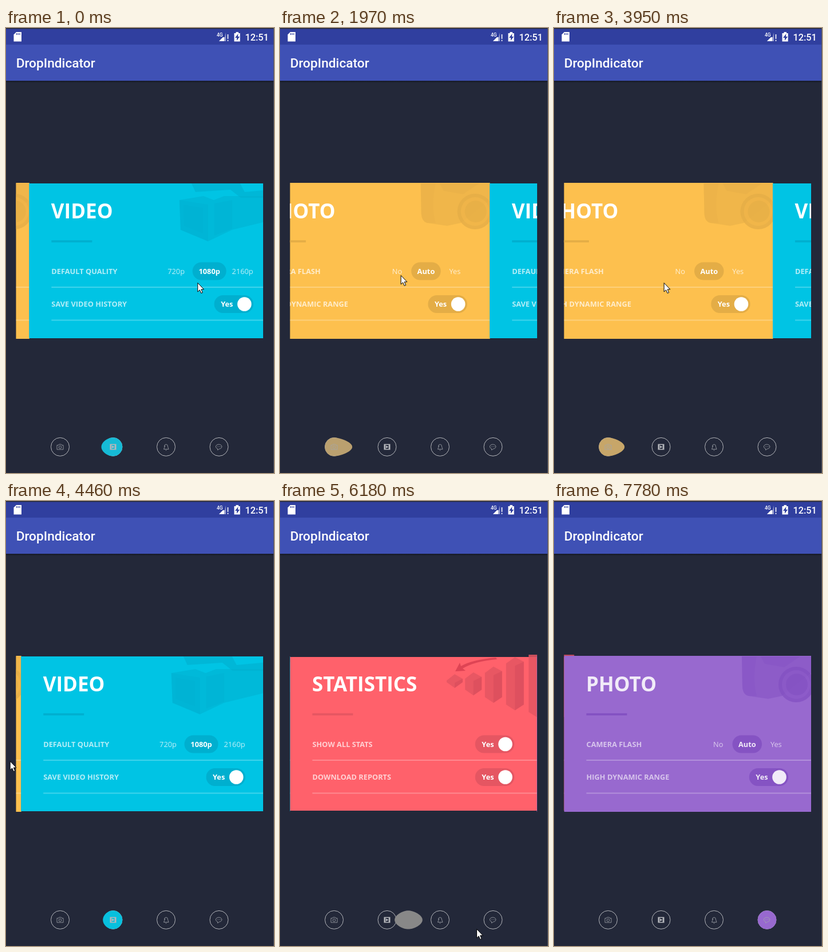
An HTML page for the animation above (8890 ms loop, 468x776 px).

```html
<!DOCTYPE html>
<html lang="en">
<head>
<meta charset="utf-8">
<title>DropIndicator</title>
<style>
html, body { margin: 0; width: 100%; height: 100%; overflow: hidden; background: #232839; }
svg { display: block; width: 100vw; height: 100vh; }
.bar { font-family: Roboto, sans-serif; font-weight: 500; fill: #fff; }
.card { font-family: "Open Sans", sans-serif; font-size: 12.8px; fill: #fff; }
.title { font-size: 35px; font-weight: 700; }
.label { font-weight: 700; fill-opacity: .7; }
.on { font-weight: 700; }
.off { fill-opacity: .75; }
.mid { text-anchor: middle; }
.icons { fill: none; stroke: #a3a6ad; stroke-width: .8; }
.icons .solid { fill: #b4b6bb; stroke: none; }
</style>
</head>
<body>
<svg viewBox="0 0 468 776" xmlns="http://www.w3.org/2000/svg">
  <defs>
    <clipPath id="pager"><rect x="17.500" y="268" width="431.500" height="276"/></clipPath>
    <linearGradient id="shade" x1="0" y1="0" x2="0" y2="1">
      <stop offset="0" stop-color="#11141f" stop-opacity=".75"/>
      <stop offset="1" stop-color="#11141f" stop-opacity="0"/>
    </linearGradient>
  </defs>

  <rect width="468" height="776" fill="#232839"/>
  <rect y="92" width="468" height="4" fill="url(#shade)"/>
  <rect width="468" height="29" fill="#303f9f"/>
  <rect width="468" height="1.500" fill="#292a33"/>
  <rect y="29" width="468" height="63" fill="#3f51b5"/>
  <rect x="467" width="1" height="776" fill="#50535e"/>

  <g class="bar">
    <path d="M18 7 H27 V23.500 H13.500 V11.500Z"/>
    <path d="M18.500 9 V12 M21.200 9 V12 M24 9 V12" stroke="#303f9f" stroke-width="1.300"/>
    <text x="368" y="14.500" font-size="8.500">4G</text>
    <path d="M384 8 V23 H372 L379 16 H382Z" opacity=".5"/>
    <path d="M381 16 V23 H372 L379 16Z"/>
    <path d="M387.500 11 V19 M387.500 20.700 V23" stroke="#fff" stroke-width="1.600"/>
    <path d="M401.500 7 H406 V9 H408.700 V23.500 H398.500 V9 H401.500Z"/>
    <path d="M405.500 10 L400 17 H403 V22 L408 15 H405Z" fill="#303f9f"/>
    <text x="417.500" y="21.500" font-size="16.300">12:51</text>
    <text x="17.700" y="69" font-size="22.700">DropIndicator</text>
  </g>

  <g clip-path="url(#pager)"><g id="cards" class="card"></g></g>

  <g id="rings" fill="none" stroke="#b4b6bb"></g>
  <path id="blob"/>
  <g class="icons">
    <path d="M89 727.500 H91.500 L92.500 726 H96.500 L97.500 727.500 H100 V735 H89Z"/>
    <circle cx="94.500" cy="731" r="2.300"/>
    <path class="solid" fill-rule="evenodd" d="M181.500 725.500 H192.500 V735.500 H181.500Z M184.300 727 H189.700 V734 H184.300Z"/>
    <path class="solid" d="M185 728 L189.500 730.500 L185 733Z"/>
    <path d="M275.500 734.500 Q279 726 276.500 730 Q276.500 726 279.500 726 Q282.500 726 282.500 730 L284 734.500Z M278.500 736.300 H280.500"/>
    <path d="M369.500 733.700 A5.300 4 0 1 1 372.500 734 L369.500 736Z"/>
    <path d="M369 730 H376" stroke-dasharray="1.200 1.400"/>
  </g>

  <path id="cursor" d="M.5 .5 V16 L4 12.700 L6.500 18.500 L9 17.400 L6.600 11.800 H11.300Z" fill="#fff" stroke="#000"/>
</svg>

<script>
const LOOP = 8890, WIDTH = 431, RADIUS = 16.2, KAPPA = 0.5523;
const HOME = 94.5, GAP = 92.5, MID_Y = 730.4, CARD_MID = 406;
const byId = id => document.getElementById(id);
const cards = byId('cards'), blob = byId('blob'), cursor = byId('cursor');

const text = (cls, x, y, s) => `<text class="${cls}" x="${x}" y="${y}">${s}</text>`;
const pill = (mid, y, w, color) =>
  `<rect x="${mid - w / 2}" y="${y - 15.5}" width="${w}" height="31" rx="15.5" fill="${color}"/>`;
const toggle = (y, c) => pill(357, y, 68.5, c.dark) +
  text('on', 334.3, y + 4.6, 'Yes') + `<circle cx="375.5" cy="${y}" r="12.3"/>`;

// Three options, the middle one selected
const choice = (names, mid, gap, w) => c => pill(mid, 424, w, c.dark) +
  names.map((s, i) => text(`mid ${i === 1 ? 'on' : 'off'}`, mid + gap * (i - 1), 428.6, s)).join('');
const flash = choice(['No', 'Auto', 'Yes'], 319.3, 50.5, 51.5);
const quality = choice(['720p', '1080p', '2160p'], 314.3, 58, 59);

const slr = c => `<g fill="${c.dark}">
  <path opacity=".5" d="M310 271 L311 324 Q312 338 322 340 L356 345 L380 340 L431 300 V271Z"/>
  <path opacity=".3" d="M310 271 L311 324 Q312 338 322 340 H336 Q328 310 336 271Z"/>
  <path opacity=".4" d="M343 271 L350 284 L384 290 L412 271Z"/>
  <circle cx="405" cy="320" r="31" opacity=".75"/>
  <circle cx="405" cy="320" r="25" fill="${rgb(c.color)}" opacity=".3"/>
  <circle cx="406" cy="320" r="19" opacity=".6"/></g>`;

const camcorder = c => `<g fill="${c.dark}">
  <path opacity=".5" d="M262 300 L304 293 L322 300 L340 293 H431 V333 L354 352 L312 372 L264 352Z"/>
  <path opacity=".4" d="M262 300 L312 308 V372 L264 352Z"/>
  <path opacity=".4" d="M269 308 L303 314 V358 L270 345Z"/>
  <path opacity=".6" d="M283 271 H368 L376 286 L431 281 V296 H369 L351 282 L290 286Z"/>
  <path opacity=".4" d="M323 306 L354 300 V350 L323 362Z"/></g>`;

// Growing bars in perspective, with an arrow over them
function chart(c) {
  let bars = '';
  for (let i = 0; i < 5; i++) {
    const x = 273 + 31 * i + 1.2 * i * i, w = 28 + i, m = x + w / 2;
    const top = 302 - 3.3 * i * i, end = 326 + 13 * i;
    bars += `<path d="M${x} ${top + 11} L${m} ${top} L${x + w} ${top + 8} V${end - 10} L${m} ${end} L${x} ${end - 10}Z"/>
      <path d="M${m} ${top + 15} L${x + w} ${top + 8} V${end - 10} L${m} ${end}Z" fill="#bd3d50" opacity=".3"/>`;
  }
  return `<g fill="${c.dark}" opacity=".85">${bars}
    <path d="M359 273 Q316 277 298 288 L296 282 L288 297 L306 296 L301 292 Q323 279 361 276Z" fill="#d93f51"/></g>`;
}

const photo = { title: 'PHOTO', rows: ['CAMERA FLASH', 'HIGH DYNAMIC RANGE'], top: 270, art: slr, first: flash };
const PAGES = [
  { ...photo, color: [253, 192, 78], dark: '#e4ad46' },
  { color: [0, 196, 228], dark: '#00afcf', title: 'VIDEO', rows: ['DEFAULT QUALITY', 'SAVE VIDEO HISTORY'],
    top: 271, art: camcorder, first: quality },
  { color: [255, 97, 107], dark: '#e55662', title: 'STATISTICS', rows: ['SHOW ALL STATS', 'DOWNLOAD REPORTS'],
    top: 272, art: chart, first: c => toggle(424, c) },
  { ...photo, color: [152, 105, 207], dark: '#8350c2', fade: .87 }
];

const rgb = color => `rgb(${color.map(Math.round)})`;
const card = (c, i) => `<g transform="translate(${i * WIDTH} 0)">
  <rect x="-.5" y="${c.top}" width="${WIDTH + .5}" height="${2 * (CARD_MID - c.top)}" fill="${rgb(c.color)}"/>
  ${c.art(c)}
  <rect x="38.500" y="370.200" width="71" height="3.600" fill="${c.dark}"/>
  <path d="M38.500 452 H431 M38.500 509.500 H431" stroke="#fff" stroke-opacity=".25" stroke-width="2"/>
  <g opacity="${c.fade || 1}">
    ${text('title', 38, 332, c.title)}
    ${c.rows.map((s, k) => text('label', 38.5, 428.6 + 57.5 * k, s)).join('')}
    ${c.first(c)}${toggle(481.5, c)}
  </g></g>`;

cards.innerHTML = PAGES.map(card).join('');
byId('rings').innerHTML = PAGES.map((_, i) =>
  `<circle cx="${HOME + i * GAP}" cy="${MID_Y}" r="16"/>`).join('');

const clamp = v => Math.min(1, Math.max(0, v));
const span = (v, a, b) => clamp((v - a) / (b - a));
const easeBoth = u => (1 - Math.cos(Math.PI * u)) / 2;
const easeOut = u => 1 - (1 - u) ** 4;

// The card is pulled aside twice and slips back each time.
const pull = (t, from, to, peak) => peak * Math.sin(Math.PI * span(t, from, to));
const pulls = t => pull(t, 1000, 2160, .39) + pull(t, 2390, 3390, .414);
const swipe = t => .947 * (1 - easeBoth(span(t, 20, 640))) + pulls(t) + easeBoth(span(t, 3750, 4532));

// Taps move the cards quickly while the drop follows at its own pace.
const taps = (t, length, ease) =>
  [5655, 6700].reduce((sum, at) => sum + ease(span(t, at, at + length)), 0);

// Places the hand passes: [time, x, y]
const STOPS = [[0, 334, 444], [420, 456, 448], [1000, 293, 436], [2160, 293, 430], [2390, 328, 443],
  [3390, 328, 446], [3750, 258, 445], [3950, 192, 444], [4450, 3, 450], [5040, 200, 621],
  [5430, 279, 735], [6180, 343, 746], [6600, 372, 740], [7290, 372, 740], [7760, 152, 584]];

function pointer(t) {
  const n = STOPS.findIndex(s => s[0] > t);
  if (n < 0) return null;
  const [t0, x0, y0] = STOPS[n - 1], [t1, x1, y1] = STOPS[n], u = span(t, t0, t1);
  return [x0 + (x1 - x0) * u - WIDTH * pulls(t), y0 + (y1 - y0) * u];
}

function drawBlob(pos) {
  const i = Math.min(2, Math.floor(pos)), f = pos - i;
  let left = 1, right = 1;
  if (f <= .2) right = 1 + 5 * f;
  else if (f <= .8) {
    left = 1 + span(f, .2, .8);
    right = 3 - left;
  } else left = 1 + 5 * (1 - f);

  const x = HOME + GAP * (i + span(f, .2, .9)), y = MID_Y, r = RADIUS, k = r * KAPPA;
  const l = x - r * left, e = x + r * right;
  blob.setAttribute('d', `M${x} ${y - r} C${x + k} ${y - r} ${e} ${y - k} ${e} ${y}
    S${x + k} ${y + r} ${x} ${y + r} S${l} ${y + k} ${l} ${y} S${x - k} ${y - r} ${x} ${y - r}Z`);

  const base = PAGES[f < .5 ? i : i + 1].color, gray = clamp(3 * Math.min(f, 1 - f));
  blob.setAttribute('fill', rgb(base.map(v => v + (136 - v) * gray)));
}

function draw(t) {
  const page = swipe(t), hand = pointer(t);
  cards.setAttribute('transform', `translate(${18 - (page + taps(t, 420, easeOut)) * WIDTH} 0)`);
  drawBlob(page + taps(t, 1080, easeBoth));
  cursor.setAttribute('visibility', hand ? 'visible' : 'hidden');
  if (hand) cursor.setAttribute('transform', `translate(${hand})`);
}

const start = performance.now();
function tick() {
  draw((performance.now() - start) % LOOP);
  requestAnimationFrame(tick);
}
tick();
</script>
</body>
</html>
```
